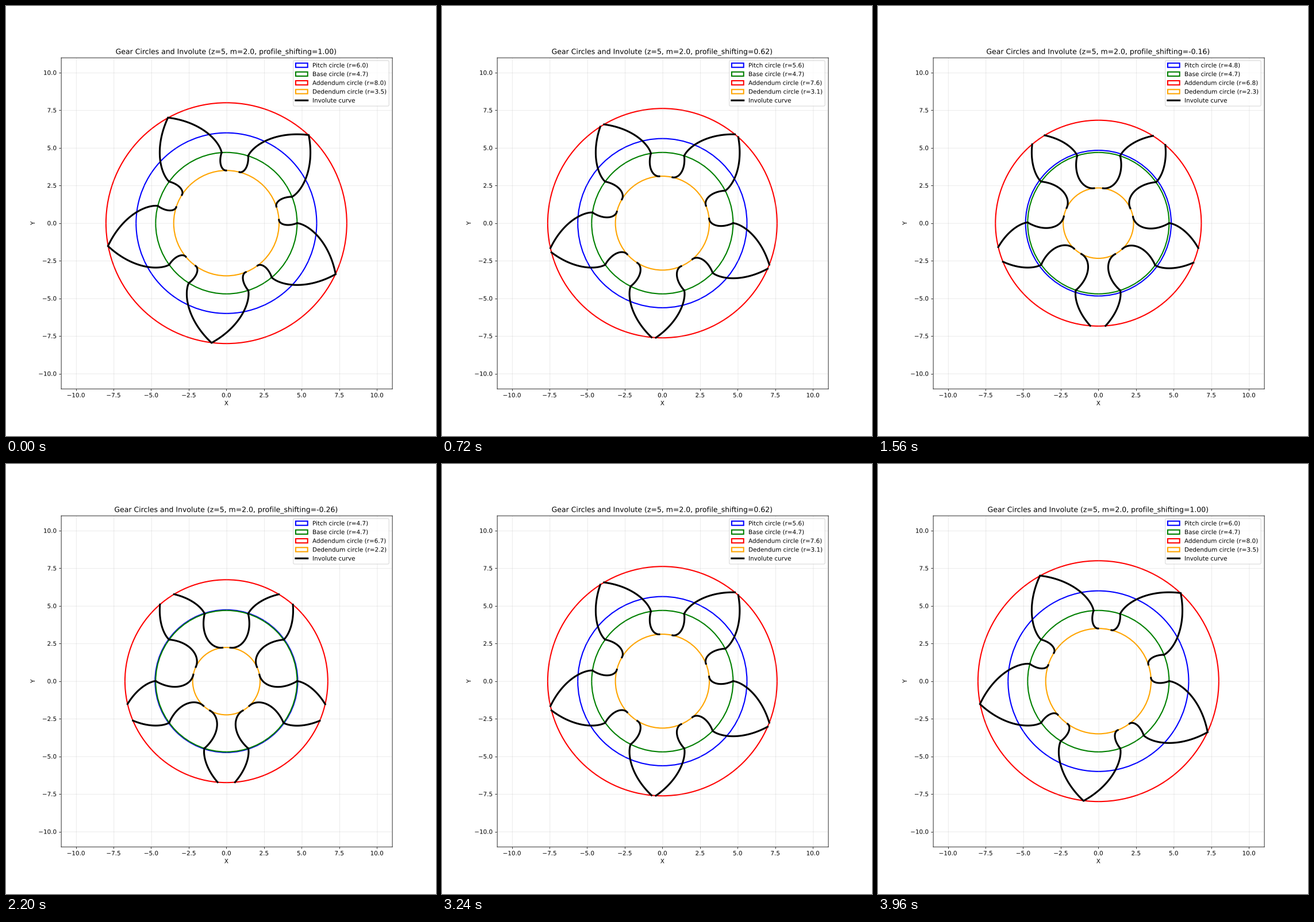
A matplotlib script that plays this animation: 748x748 px, repeating every 4 s.

```python
import numpy as np
import matplotlib.pyplot as plt
from matplotlib.animation import FuncAnimation
from matplotlib.patches import Circle
from matplotlib.patheffects import Normal
from matplotlib.transforms import ScaledTranslation

TEETH = 5
MODULE = 2.0
FRAMES = 100
BASE = MODULE * TEETH / 2 * np.cos(np.radians(20))
NAMES = ["Pitch", "Base", "Addendum", "Dedendum"]
COLORS = ["blue", "green", "red", "orange"]

# Smooth sub-pixel lines and text (a path effect draws text as outlines).
plt.rcParams.update({"text.hinting": "none", "path.snap": False,
                     "path.effects": [Normal()]})


def shift_at(i):
    """Profile shift swings between 1.0 and -0.3 over one loop."""
    return 0.35 + 0.65 * np.cos(2 * np.pi * i / (FRAMES - 1))


def radii(shift):
    pitch = MODULE * (TEETH + shift) / 2
    return [pitch, BASE, pitch + MODULE, pitch - 1.25 * MODULE]


def roll_angle(r):
    return np.sqrt(max((r / BASE) ** 2 - 1, 0))


def involute(r_end):
    """Radius and polar angle of the flank outside the base circle."""
    t = np.linspace(0, roll_angle(r_end), 80)
    return BASE * np.hypot(1, t), np.arctan(t) - t


def trochoid(r_root):
    """Radius and polar angle of the root curve, ending at angle 0."""
    t = np.linspace(0, np.sqrt(BASE**2 - r_root**2) / BASE, 80)
    phi = t - np.arctan2(BASE * t, r_root)
    return np.hypot(r_root, BASE * t), phi - phi[-1]


fig, ax = plt.subplots(figsize=(10, 10), dpi=74.8)
ax.set_aspect("equal")
ax.set_xlim(-11, 11)
ax.set_ylim(-11, 11)
ax.set_xlabel("X")
ax.set_ylabel("Y")
ax.grid(True, alpha=0.3)

# Frame and grid sit a fraction of a pixel right and down.
nudge = ScaledTranslation(0.01, -0.005, fig.dpi_scale_trans)
for spine in ax.spines.values():
    spine.set_transform(spine.get_spine_transform() + nudge)
for line in [*ax.get_xgridlines(), *ax.get_ygridlines()]:
    line.set_transform(line.get_transform() + nudge)

circles = []
for name, color, r in zip(NAMES, COLORS, radii(1.0)):
    circle = Circle((0, 0), r, fill=False, color=color, lw=2,
                    label=f"{name} circle (r={r:.1f})")
    circles.append(ax.add_patch(circle))

# Each tooth has two flanks, each made of an involute and a root curve.
lines = [ax.plot([], [], color="black", lw=3)[0] for _ in range(4 * TEETH)]
lines[0].set_label("Involute curve")
legend = ax.legend(loc="upper right", labelspacing=0.54)
title = ax.set_title("")


def update(i):
    shift = shift_at(i)
    sizes = radii(shift)
    pitch, _, outer, root = sizes
    for circle, text, name, r in zip(circles, legend.get_texts(), NAMES, sizes):
        circle.set_radius(r)
        text.set_text(f"{name} circle (r={r:.1f})")

    t = roll_angle(pitch)
    width = np.pi / TEETH + 2 * (t - np.arctan(t))
    curves = [involute(outer), trochoid(root)]
    free = iter(lines)
    for k in range(TEETH):
        start = 2 * np.pi * k / TEETH
        for side, offset in ((1, start), (-1, start - width)):
            for r, phi in curves:
                a = offset + side * phi
                next(free).set_data(r * np.cos(a), r * np.sin(a))

    title.set_text(f"Gear Circles and Involute (z={TEETH}, m={MODULE}, "
                   f"profile_shifting={shift:.2f})")
    return [*circles, *lines, title, legend]


anim = FuncAnimation(fig, update, frames=FRAMES, interval=40,
                     repeat=True, repeat_delay=0, blit=False)
plt.show()
```
